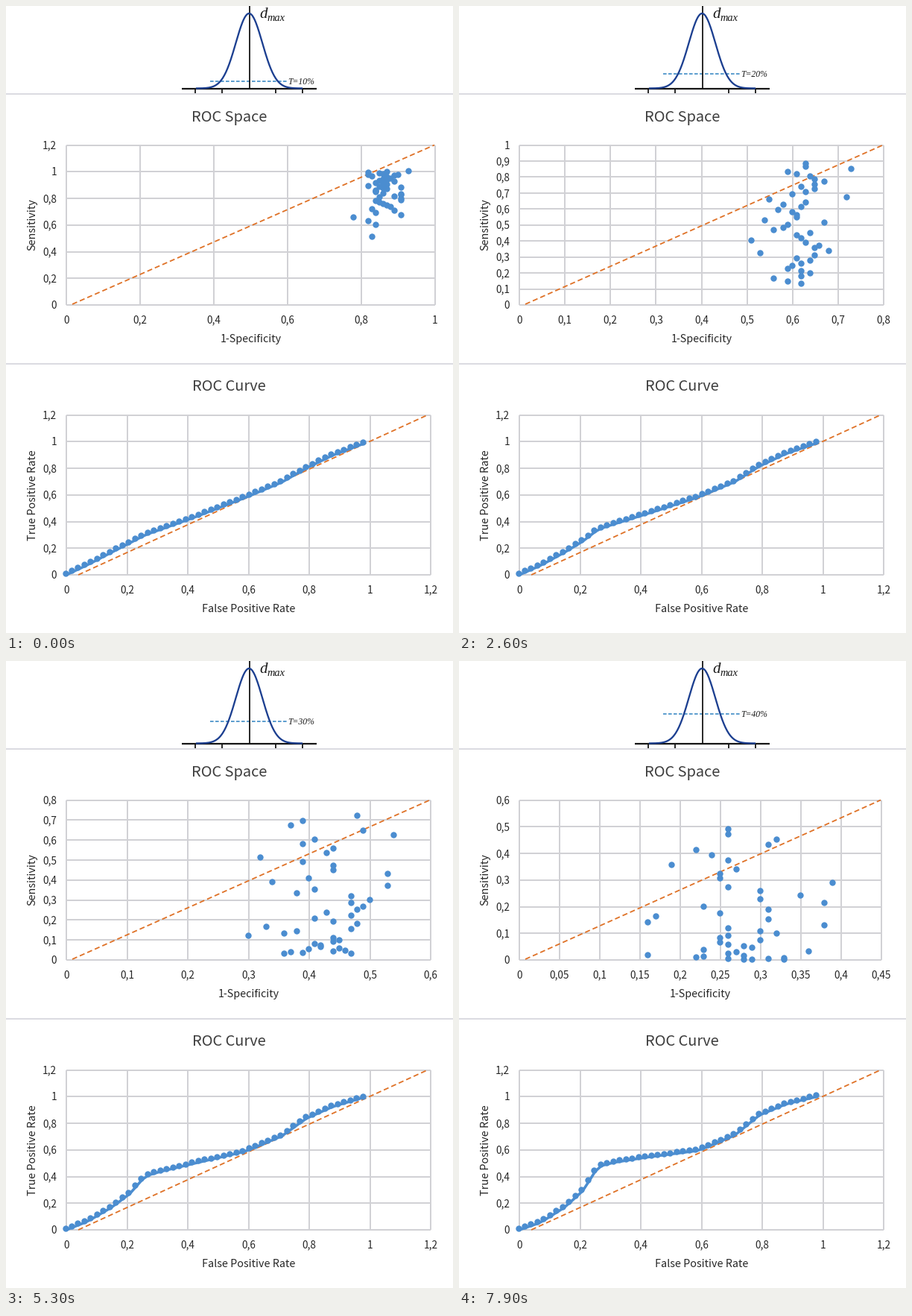
A matplotlib script for the animation above (8 s loop, 600 by 841 pixels).

```python
import numpy as np
import matplotlib.pyplot as plt
from matplotlib.animation import FuncAnimation

W, H, DPI = 600, 841, 64
PT = 72 / DPI  # points per pixel
STEP, FRAMES = 100, 80
SWITCH = (15, 39, 64)  # frames at which the threshold rises
COUNT = 48  # dots in each chart
LEFT = 81

BLUE, ORANGE = "#4b8dd0", "#df7126"
GRID, RULE = "#d1d1d5", "#d3d3da"
INK, TITLE = "#262626", "#3e3e3e"

# Key points of the curve in percent: rate, height at T=10%, gain up to T=40%
KEYS = np.array([
    (0, 0, 0), (7, 7.5, -2), (15, 17, 0), (21, 24, 5.5), (26, 30, 17.5),
    (31, 34, 16.5), (42, 43, 11.5), (59, 58, 1.5), (71, 69.5, 1.5),
    (79, 80, 6), (88, 90, 4.5), (98, 98.5, 1.5),
]).T / 100

fig = plt.figure(figsize=(W / DPI, H / DPI), dpi=DPI, facecolor="white")
ax = fig.add_axes([0, 0, 1, 1])
ax.set(xlim=(0, W), ylim=(H, 0))
ax.axis("off")


def line(x, y, color, width, z=1, **kw):
    kw.setdefault("solid_capstyle", "butt")
    return ax.plot(x, y, color=color, lw=width * PT, zorder=z, **kw)


def dashed(x, y, color, width, on, off, z=2):
    return line(x, y, color, width, z, dashes=(on / width, off / width),
                dash_capstyle="butt")


def dots(x, y):
    return ax.plot(x, y, "o", color=BLUE, ms=8.4 * PT, mew=0, zorder=4)


def text(x, y, s, size, color=INK, ha="center", font="Noto Sans CJK JP", **kw):
    return [ax.text(x, y, s, fontsize=size * PT, color=color, ha=ha,
                    va="baseline", family=font, zorder=5, **kw)]


def serif(x, y, s, size):
    return text(x, y, s, size, "#1a1a1a", "left", "Liberation Serif",
                style="italic")


def side_label(y, s):
    return text(39.5, y, s, 14.4, rotation=90, rotation_mode="anchor")


def ticks(top, step):
    return np.arange(round(top / step) + 1) * step


def comma(v):
    return f"{round(v, 2):g}".replace(".", ",")


def chart(right, bottom, top, xaxis, yaxis, name):
    """Grid, tick labels and horizontal axis name."""
    out = []
    for v in ticks(*xaxis):
        x = LEFT + (right - LEFT) * v / xaxis[0]
        out += line([x, x], [top, bottom], GRID, 2)
        out += text(x, bottom + 24.5, comma(v), 13.6)
    for v in ticks(*yaxis):
        y = bottom + (top - bottom) * v / yaxis[0]
        out += line([LEFT, right], [y, y], GRID, 2)
        out += text(68, y + 5, comma(v), 13.6, ha="right")
    return out + text((LEFT + right) / 2, bottom + 50, name, 14.3)


def cloud(seed, mean, spread, low, high, power):
    """Bell-shaped columns; heights follow a power law between two limits."""
    rng = np.random.default_rng(seed)
    x = rng.normal(mean, spread, COUNT)
    x = np.clip(x, mean - 2.2 * spread, mean + 2.2 * spread).round(2)
    y = low + (high - low) * np.linspace(0, 1, COUNT) ** power
    return x, rng.permutation(y)


def curve(k):
    """Dots on the curve for threshold k = 0..3."""
    rate, base, gain = KEYS
    x = np.linspace(0, rate[-1], COUNT)
    y = np.interp(x, rate, base + gain * (k / 3) ** 1.3)
    return 79.5 + 407.5 * x, 761.2 - 178.75 * y


def state(k, right, xaxis, yaxis, spread):
    """Everything that depends on the threshold."""
    pct = 10 * (k + 1)
    level = 111 - pct
    out = dashed([274, 378], [level, level], "#2a80c0", 1.5, 4.6, 2.4)
    out += serif(378.5, level + 4, f"T={pct}%", 11.8)
    out += chart(right, 401, 186.5, xaxis, yaxis, "1-Specificity")
    out += dashed([89, right - 1], [400, 186.5], ORANGE, 1.8, 7, 4)
    x, y = cloud(k, *spread)
    out += dots(LEFT - 1 + (right - LEFT) * x / xaxis[0],
                400 - 214.5 * y / yaxis[0])
    x, y = curve(k)
    out += line(x + 1.5, y + 1.8, BLUE, 3.6, 3, solid_joinstyle="round")
    return out + dots(x, y)


# Bell curve
line([236, 417], [111, 111], "#151515", 2.2, 3)
for x in (254, 290, 362, 398):
    line([x, x], [111, 117], "#151515", 1.8, 3)
line([326.5, 326.5], [0, 111], "#151515", 1.8, 3)
u = np.linspace(255, 398, 200)
line(u, 110.5 - 100.5 * np.exp(-((u - 326.3) / 17.8) ** 2 / 2), "#1c3f90", 2.3, 4)
serif(340, 16, "d", 21)
serif(350.5, 20, "max", 14.4)

# Fixed parts of both charts
for y in (118, 480):
    line([0, W], [y, y], RULE, 1.6)
text(299.3, 154.5, "ROC Space", 20, TITLE)
text(299.3, 516.5, "ROC Curve", 20, TITLE)
side_label(293, "Sensitivity")
side_label(656, "True Positive Rate")
chart(570, 763, 548.5, (1.2, 0.2), (1.2, 0.2), "False Positive Rate")
dashed([97, 566], [763, 548.5], ORANGE, 1.8, 7, 4)

states = [
    state(0, 576, (1, 0.2), (1.2, 0.2), (0.86, 0.035, 0.51, 1, 0.45)),
    state(1, 570, (0.8, 0.1), (1, 0.1), (0.62, 0.05, 0.13, 0.88, 1)),
    state(2, 570, (0.6, 0.1), (0.8, 0.1), (0.425, 0.058, 0.03, 0.72, 1.7)),
    state(3, 567, (0.45, 0.05), (0.6, 0.1), (0.275, 0.052, 0, 0.49, 2)),
]


def update(i):
    now = sum(i >= s for s in SWITCH)
    for k, group in enumerate(states):
        for artist in group:
            artist.set_visible(k == now)


anim = FuncAnimation(fig, update, frames=FRAMES, interval=STEP,
                     init_func=lambda: update(0), repeat=True, repeat_delay=0)
plt.show()
```
